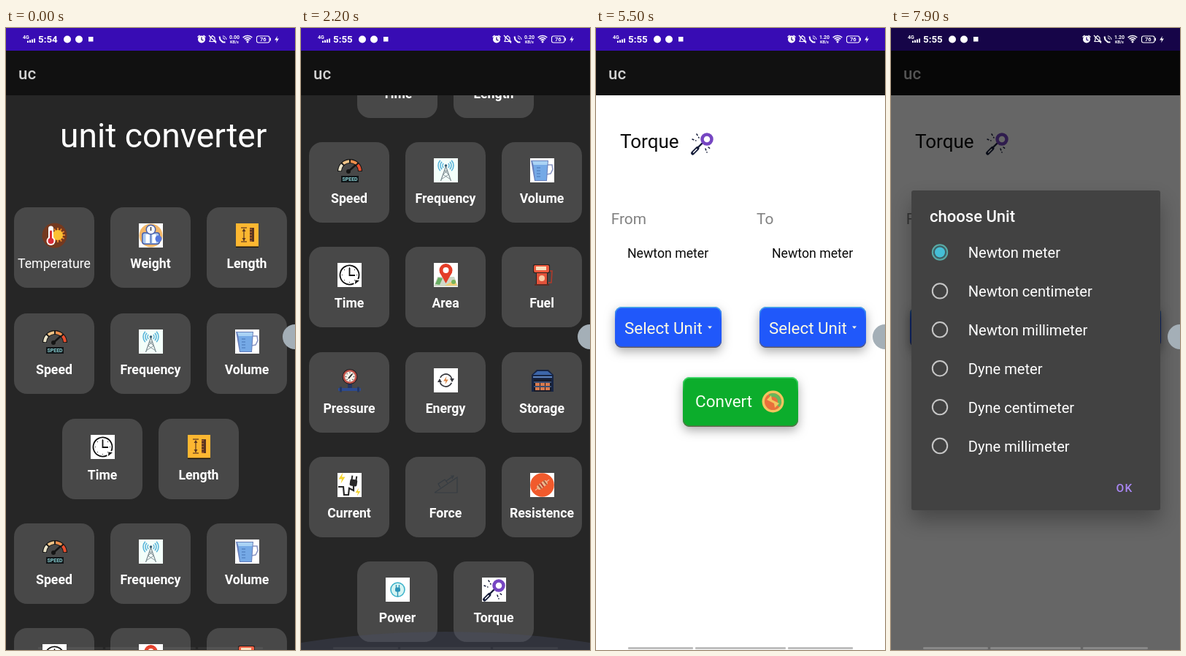
An HTML page with a canvas that plays this animation: 396x850 px, repeating every 8 s.

```html
<!DOCTYPE html>
<html lang="en">
<head>
<meta charset="utf-8">
<title>Unit converter</title>
<style>
html, body { margin: 0; width: 100%; height: 100%; overflow: hidden; background: #262626; }
canvas { display: block; width: 396px; height: 850px; }
</style>
</head>
<body>
<canvas id="stage" width="396" height="850"></canvas>
<script>
const W = 396, H = 850, LOOP = 8000, STEP = 100, TAU = Math.PI * 2;
const g = document.getElementById('stage').getContext('2d');

// ---- drawing helpers ----
function rect(x, y, w, h, fill, r = 0) {
  g.fillStyle = fill;
  g.beginPath();
  g.roundRect(x, y, w, h, r);
  g.fill();
}
function disc(x, y, r, fill) {
  g.fillStyle = fill;
  g.beginPath();
  g.arc(x, y, r, 0, TAU);
  g.fill();
}
function arc(x, y, r, color, width, from = 0, to = TAU) {
  g.strokeStyle = color;
  g.lineWidth = width;
  g.beginPath();
  g.arc(x, y, r, from, to);
  g.stroke();
}
function trace(pts) {
  g.beginPath();
  for (let i = 0; i < pts.length; i += 2) g.lineTo(pts[i], pts[i + 1]);
}
function line(color, width, ...pts) {
  trace(pts);
  g.strokeStyle = color;
  g.lineWidth = width;
  g.stroke();
}
function poly(fill, ...pts) {
  trace(pts);
  g.fillStyle = fill;
  g.fill();
}
function text(str, x, y, size, fill, weight = 400, align = 'left', spacing = 0) {
  g.font = `${weight} ${size}px Roboto, sans-serif`;
  g.textAlign = align;
  g.letterSpacing = spacing + 'px';
  g.fillStyle = fill;
  g.fillText(str, x, y);
}
function layer(x, y, draw) {
  g.save();
  g.translate(x, y);
  draw();
  g.restore();
}
const paper = (fill = '#fff') => rect(0, 0, 33, 33, fill);
const bolt = (x, y, s, fill) => layer(x, y, () => {
  g.scale(s, s);
  poly(fill, 1, -5, -3, 1, 0, 1, -1, 5, 3, -1, 0, -1);
});

// Icons fill a 33 x 33 box.
const icons = {
  Temperature() {
    disc(16.5, 16.5, 17, '#74391f');
    for (let i = 0; i < 12; i++) {
      const a = i * TAU / 12;
      line('#ef8d2a', 1.8, 21, 16, 21 + 10 * Math.cos(a), 16 + 10 * Math.sin(a));
    }
    disc(21, 16, 7, '#fbc033');
    g.lineCap = 'round';
    line('#fff', 7, 11.5, 7, 11.5, 23);
    disc(11.5, 24, 6, '#fff');
    line('#d92c36', 3, 11.5, 11, 11.5, 24);
    disc(11.5, 24, 4, '#d92c36');
  },
  Weight() {
    paper();
    disc(16.5, 16.5, 16, '#f3b768');
    rect(4, 12, 25, 17, '#4d62a8', 4);
    rect(5.5, 13.5, 22, 14, '#a9c8f0', 3);
    line('#fff', 5, 12, 15, 12, 27);
    line('#fff', 5, 21, 15, 21, 27);
    line('#4d62a8', 1, 16.5, 15, 16.5, 27);
    disc(16.5, 8.5, 7, '#4d62a8');
    disc(16.5, 8.5, 5.5, '#f4f7ff');
    line('#333', 1.4, 16.5, 10, 16.5, 5);
    disc(27, 21, 4.5, '#5477dc');
  },
  Length() {
    rect(1, 0, 31, 33, '#fdb731');
    rect(1, 31.5, 31, 1.5, '#17120c');
    rect(20, 6, 6, 19, '#5a3520');
    for (let y = 8; y < 25; y += 4) line('#d77b33', 1, 20, y, 23, y);
    line('#5a3520', 1.2, 12, 8, 12, 24);
    line('#5a3520', 1.2, 8, 6, 16, 6);
    line('#5a3520', 1.2, 8, 25, 16, 25);
    poly('#5a3520', 12, 7, 9.5, 11, 14.5, 11);
    poly('#5a3520', 12, 24, 9.5, 20, 14.5, 20);
  },
  Speed() {
    arc(17, 18, 14, '#151515', 6, Math.PI, TAU);
    ['#e9e2c8', '#efc488', '#f08f4c', '#e9502f'].forEach((c, i) =>
      arc(17, 18, 14, c, 3.8, Math.PI * (1 + i / 4) + .07, Math.PI * (1.25 + i / 4) - .07));
    line('#151515', 2.4, 15, 18, 25, 9);
    disc(15, 18, 3, '#151515');
    rect(5, 24, 24, 9, '#101518');
    text('SPEED', 17, 31, 7, '#86cdd0', 700, 'center');
  },
  Frequency() {
    paper('#f3fffa');
    line('#7d8b90', 1.2, 9.5, 31, 16.5, 11, 23.5, 31);
    line('#7d8b90', .9, 10, 29, 20.5, 22, 14, 17, 19, 17, 12.5, 22, 23, 29);
    disc(16.5, 10, 1.8, '#3a5f74');
    for (const r of [4.5, 7.5, 10.5]) {
      arc(16.5, 10, r, '#5cb6da', 1.6, -.75, .75);
      arc(16.5, 10, r, '#5cb6da', 1.6, Math.PI - .75, Math.PI + .75);
    }
  },
  Volume() {
    paper();
    line('#8a96c4', 1.6, 24, 9, 30, 9, 31, 15, 28, 21, 23, 22);
    poly('#6a81bd', 1, 3, 25, 3, 23, 31, 6, 31);
    poly('#a9d2f4', 3, 4, 24, 4, 23.5, 9, 4.5, 9);
    poly('#75a9e6', 4.5, 9, 23.5, 9, 22, 30, 7, 30);
    for (let y = 13; y < 28; y += 4) line('#4774b5', 1, 9, y, 14, y);
  },
  Time() {
    paper();
    arc(16.5, 16.5, 13, '#101010', 1.8, 1.1, TAU + .45);
    line('#101010', 1.8, 16.5, 7, 16.5, 17, 24, 17);
    poly('#101010', 24, 29, 24.5, 23.5, 30, 24);
    for (let i = 0; i < 8; i++) disc(16.5 + 10 * Math.cos(i * TAU / 8), 16.5 + 10 * Math.sin(i * TAU / 8), .6, '#222');
  },
  Area() {
    paper();
    poly('#cfd8c8', 0, 32, 5, 19, 28, 19, 33, 32);
    poly('#68ad63', 2, 29, 6, 20, 12, 21, 8, 30);
    poly('#f0cc72', 15, 31, 29, 23, 32, 31);
    disc(27, 26, 3, '#78b45c');
    poly('#e43d28', 8, 13, 25, 13, 16.5, 28);
    disc(16.5, 10, 9, '#e43d28');
    disc(16.5, 10, 4, '#fff');
  },
  Fuel() {
    line('#b33a2a', 1.5, 26, 11, 30, 11, 29, 27, 25, 27);
    rect(4, 2, 23, 12, '#26211f', 2);
    rect(5, 3, 21, 10, '#ed5a3e', 2);
    rect(8, 5, 14, 5, '#f8dfbd');
    rect(8, 14, 16, 16, '#26211f', 1);
    rect(9, 14, 14, 15, '#e2523a');
    disc(16, 21, 4, '#f8c9a3');
    rect(6, 29, 20, 2, '#5b2c24');
  },
  Pressure() {
    rect(14, 21, 6, 7, '#26365f');
    rect(1, 27, 31, 4, '#2d4b91', 1);
    rect(3, 25.5, 3, 7, '#233765');
    rect(27, 25.5, 3, 7, '#233765');
    disc(17, 11.5, 10.5, '#231c20');
    disc(17, 11.5, 9.5, '#c2544a');
    disc(17, 11.5, 7, '#f4eee6');
    for (let i = 0; i < 8; i++) disc(17 + 5.5 * Math.cos(i * TAU / 8), 11.5 + 5.5 * Math.sin(i * TAU / 8), .7, '#222');
    line('#222', 1.8, 15, 14, 20, 8);
  },
  Energy() {
    paper();
    arc(16.5, 16.5, 8.5, '#37383e', 1.7, -2.7, -.3);
    arc(16.5, 16.5, 8.5, '#37383e', 1.7, .4, 2.8);
    poly('#37383e', 22, 14, 28, 14, 25, 19);
    poly('#37383e', 5, 19, 11, 19, 8, 14);
    bolt(16.5, 16.5, 1.1, '#d98445');
  },
  Storage() {
    poly('#172544', 2, 9, 9, 2, 25, 2, 32, 9, 32, 32, 2, 32);
    poly('#3c65aa', 4, 9, 10, 4, 24, 4, 30, 9);
    rect(4, 11, 26, 2, '#5c82be');
    rect(5, 15, 24, 17, '#171b2a');
    line('#5c82be', 1, 5, 19, 29, 19);
    for (let i = 0; i < 6; i++) rect(7 + i % 3 * 7, 20 + (i > 2) * 6, 6, 4, '#d97a4d');
    line('#5c82be', 1, 5, 25, 29, 25);
  },
  Current() {
    paper();
    bolt(6, 7, 1.5, '#f5d42e');
    bolt(28, 26, 1.1, '#f5d42e');
    line('#282828', 2.2, 1, 19, 8, 19, 9, 30, 15, 30, 16, 21, 22, 24, 22, 18);
    layer(22, 13, () => {
      g.rotate(.15);
      rect(-5, -4, 10, 9, '#282828', 2);
      rect(-4, -9, 2, 6, '#282828');
      rect(2, -9, 2, 6, '#282828');
    });
  },
  Force() {
    const c = '#363c42';
    line(c, 1.2, 1, 27, 32, 27, 32, 6, 1, 27);
    line(c, 1.2, 9, 20, 6, 15, 15, 9, 19, 14);
    line(c, 1.2, 17, 11, 27, 4);
    line(c, 1.2, 23, 4, 27, 4, 25, 8);
  },
  Resistence() {
    paper();
    disc(16.5, 16.5, 16.3, '#f15a2c');
    layer(16.5, 16.5, () => {
      g.rotate(-.65);
      line('#f3b79a', 1, -12, 0, 12, 0);
      rect(-8, -3.5, 16, 7, '#efb78c', 3);
      rect(-5, -3.5, 2, 7, '#a5573a');
      rect(-1, -3.5, 2, 7, '#c23a2c');
      rect(4, -3.5, 2, 7, '#a5573a');
    });
  },
  Power() {
    paper();
    disc(16.5, 16.5, 10, '#d5f4f2');
    arc(16.5, 16.5, 9.5, '#3fb3cb', 1.6);
    rect(13, 13.5, 7, 6, '#2b93b8', 2);
    line('#2b93b8', 1.4, 14.5, 10, 14.5, 14);
    line('#2b93b8', 1.4, 18.5, 10, 18.5, 14);
    line('#2b93b8', 1.4, 16.5, 19, 16.5, 26);
  },
  Torque() {
    paper();
    g.lineCap = 'round';
    line('#141b38', 5, 3.5, 30, 10, 23.5);
    line('#fff', 1.4, 4.5, 29, 9, 24.5);
    line('#141b38', 2.4, 10, 23, 17, 16);
    arc(23, 11, 6.5, '#7646c2', 4.5);
    g.setLineDash([2, 3]);
    line('#141b38', 1.5, 3, 11, 8, 13);
    line('#141b38', 1.5, 9, 4, 12, 9);
    line('#141b38', 1.5, 21, 24, 23, 29);
    line('#141b38', 1.5, 25, 22, 29, 25);
    g.setLineDash([]);
  }
};

const rows = [
  'Temperature Weight Length', 'Speed Frequency Volume', 'Time Length',
  'Speed Frequency Volume', 'Time Area Fuel', 'Pressure Energy Storage',
  'Current Force Resistence', 'Power Torque'
].map(r => r.split(' '));

function header() {
  rect(0, 30, W, 62, '#111');
  text('uc', 17, 70.3, 22.3, '#d2d2d2', 500);
}
function navBar(color) {
  for (const [x, w] of [[44, 89], [136, 124], [263, 89]]) rect(x, 846, w, 3, color, 1);
}

function card(name, x, y) {
  rect(x, y, 110, 110, '#484848', 18);
  layer(x + 39, y + 22, icons[name]);
  text(name, x + 55, y + 83, 17.7, '#fff', name === 'Temperature' ? 400 : 700, 'center');
}
function home(scroll, glow) {
  rect(0, 0, W, H, '#262626');
  text('unit converter', 74, 213 - scroll, 46.2, '#fff');
  rows.forEach((names, i) => {
    const y = Math.round((i ? 297 + 143.3 * i : 295) - scroll);
    if (y < -20 || y > H) return;
    const left = names.length === 3 ? 11 : 77;
    names.forEach((n, j) => card(n, left + 132 * j, y));
  });
  if (glow > 0) disc(198, H - 25 * glow + 1314, 1314, `rgba(72,76,104,${.34 * glow})`);
  header();
}

function button(x, y, w, h, fill, top, bottom) {
  g.save();
  g.shadowColor = 'rgba(0,0,0,.32)';
  g.shadowBlur = 14;
  g.shadowOffsetY = 5;
  rect(x, y, w, h, fill, 9);
  g.restore();
  const edge = g.createLinearGradient(0, y, 0, y + h);
  edge.addColorStop(0, top);
  edge.addColorStop(.3, fill);
  edge.addColorStop(.8, fill);
  edge.addColorStop(1, bottom);
  g.strokeStyle = edge;
  g.lineWidth = 1.5;
  g.beginPath();
  g.roundRect(x + .7, y + .7, w - 1.4, h - 1.4, 8.5);
  g.stroke();
}
function form(press) {
  rect(0, 0, W, H, '#fff');
  header();
  text('Torque', 33, 164, 26, '#0a0a0a');
  layer(129, 141, icons.Torque);
  ['From', 'To'].forEach((label, i) => layer(198 * i, 0, () => {
    text(label, i ? 22 : 20.7, 268, 20.8, '#808080');
    text('Newton meter', 43, 314, 17.7, '#0a0a0a');
    button(26, 381, 146, 56, '#2058fa', '#4fb4e4', '#6b5d58');
    if (press && !i) rect(27, 382, 144, 54, 'rgba(255,255,255,.2)', 8);
    text('Select Unit', 39, 418, 22.4, '#fffbe2');
    poly('#fffbe2', 153, 407.5, 159, 407.5, 156, 411);
  }));
  button(119, 477, 158, 68, '#0cad2c', '#4be078', '#6a6550');
  text('Convert', 136, 518, 22.5, '#f6fff2');
  disc(242.5, 510.5, 15, '#f3c45e');
  disc(242.5, 510.5, 11.5, '#e8703c');
  arc(242.5, 510.5, 9, '#66b85a', 5, -2.1, .7);
  poly('#f3c45e', 234, 508, 240, 502, 241, 508, 251, 513, 245, 519, 244, 513);
}

const units = ['Newton meter', 'Newton centimeter', 'Newton millimeter',
  'Dyne meter', 'Dyne centimeter', 'Dyne millimeter'];
function dialog(show, picked) {
  rect(0, 0, W, H, `rgba(0,0,0,${.6 * show})`);
  g.save();
  g.globalAlpha = show;
  const s = .94 + .06 * show;
  g.translate(198, 440);
  g.scale(s, s);
  g.translate(-198, -440);
  g.save();
  g.shadowColor = 'rgba(0,0,0,.3)';
  g.shadowBlur = 28;
  g.shadowOffsetY = 14;
  rect(28, 222, 341, 437, '#424242', 3);
  g.restore();
  text('choose Unit', 53, 265, 22, '#fff', 500);
  units.forEach((u, i) => {
    const y = 306.5 + 52.9 * i, on = !i && picked > 0;
    if (on) disc(67, y, 11, 'rgba(60,130,140,.45)');
    arc(67, y, 10.2, on ? '#58a9a4' : '#c6c6c6', 2);
    if (on) disc(67, y, 7 * picked, '#45bfd6');
    text(u, 105.7, y + 7.7, 20.1, '#fff');
  });
  text('OK', 308.5, 634, 15.5, '#aa87f5', 500, 'left', 1.2);
  g.restore();
}

function statusBar(clock, rate, dim) {
  rect(0, 0, W, 31, '#380cb4');
  rect(0, 0, W, 31, `rgba(0,0,0,${.6 * dim})`);
  const c = '#fff', bar = '#260a78';
  text('4G', 23, 15, 7, c, 700);
  for (let i = 0; i < 4; i++) rect(29 + 3 * i, 17.5 - i, 2, 2.5 + i, c);
  text(clock, 44, 20.2, 13.3, c, 700);
  disc(84, 15.5, 5, c);
  disc(100, 15.5, 5, c);
  rect(113, 12, 6.5, 6.5, c);
  // alarm
  disc(268, 15.5, 5, c);
  line(c, 1.6, 262.5, 12.5, 265.5, 10);
  line(c, 1.6, 270.5, 10, 273.5, 12.5);
  line(bar, 1.2, 268, 12.5, 268, 16, 270.5, 17);
  // muted bell
  line(c, 1.2, 278.5, 18.5, 280, 16.5, 280, 13, 283, 10.5, 286, 13, 286, 16.5, 287.5, 18.5, 278.5, 18.5);
  line(c, 1.2, 278, 10, 288, 20.5);
  // call over wireless
  line(c, 2, 292.5, 11.5, 293.5, 16, 297, 19.3, 300.5, 19.5);
  arc(297, 16, 2.5, c, 1, -1.6, 0);
  arc(297, 16, 5, c, 1, -1.6, 0);
  text(rate, 313, 14.5, 7, c, 700, 'center');
  text('KB/s', 313, 20.5, 5.5, c, 700, 'center');
  for (const r of [3.5, 6.2, 9]) arc(331, 19.5, r, c, 1.6, -2.35, -.8);
  disc(331, 19, 1.4, c);
  g.strokeStyle = c;
  g.lineWidth = 1.1;
  g.beginPath();
  g.roundRect(343.5, 11, 17.5, 9, 2.5);
  g.stroke();
  rect(361.5, 13.5, 1.5, 4, c);
  text('76', 352.2, 18.3, 7.5, c, 700, 'center');
  bolt(371, 15.5, .95, c);
}

function pointer(x, y) {
  const fill = g.createRadialGradient(x, y, 1, x, y, 10);
  fill.addColorStop(0, '#e4e2dc');
  fill.addColorStop(.75, '#cbc8c0');
  fill.addColorStop(1, '#8f8470');
  disc(x, y, 10.5, fill);
}

// ---- timeline ----
function track(t, keys) {
  if (t <= keys[0][0]) return keys[0][1];
  for (let i = 1; i < keys.length; i++) {
    const [t0, a] = keys[i - 1], [t1, b] = keys[i];
    if (t < t1) return a + (b - a) * (t - t0) / (t1 - t0);
  }
  return keys[keys.length - 1][1];
}
const scrollKeys = [[1600, 0], [1700, 50], [1800, 190], [1900, 360], [2000, 480], [2100, 550], [2200, 571]];
const glowKeys = [[2000, 0], [2200, 1], [2500, 0], [2700, 0], [3000, 1.1], [3300, 0]];
const dialogKeys = [[5900, 0], [6000, .2], [6100, .6], [6200, .9], [6300, 1]];

function render(t) {
  const scroll = t < 1600 ? 50 : track(t, scrollKeys);
  const slide = t < 4800 ? W : t >= 5200 ? 0 : Math.round(219 * Math.pow(.4, (t - 4800) / 100));
  const show = track(t, dialogKeys);
  g.clearRect(0, 0, W, H);

  if (slide > 0) {
    layer(Math.round((slide - W) / 8), 0, () => home(scroll, track(t, glowKeys)));
    navBar('rgba(255,255,255,.06)');
    if (slide < W) rect(0, 0, W, H, `rgba(0,0,0,${.14 * (1 - slide / W)})`);
  }
  if (slide < W) {
    g.save();
    g.beginPath();
    g.roundRect(slide, 0, W, H, slide ? [0, 0, 0, 27] : 0);
    g.clip();
    layer(slide, 0, () => form(t >= 5800 && t < 6100));
    navBar('#bebebe');
    g.restore();
  }
  if (show > 0) {
    dialog(show, track(t, [[7400, 0], [7600, 1]]));
    g.globalAlpha = show;
    navBar('#888');
    g.globalAlpha = 1;
  }
  statusBar(t < 1600 ? '5:54' : '5:55', t < 1600 ? '0.00' : t < 5500 ? '0.20' : '1.20', show);
  disc(396, 422, 17, '#a4afb7');

  if (t >= 1600 && t < 2000) pointer(266, 674 - scroll);
  if (t >= 2700 && t < 3100) pointer(262, 640 - (t - 2700) * 1.4);
  if (t >= 4600 && t < 4800) pointer(284, 764);
  if (t >= 5800 && t < 6000) pointer(98, 412);
  if (t >= 7400 && t < 7600) pointer(68, 308);
}

function tick(now) {
  const t = now % LOOP;
  render(t - t % STEP);
  requestAnimationFrame(tick);
}
requestAnimationFrame(tick);
</script>
</body>
</html>
```
